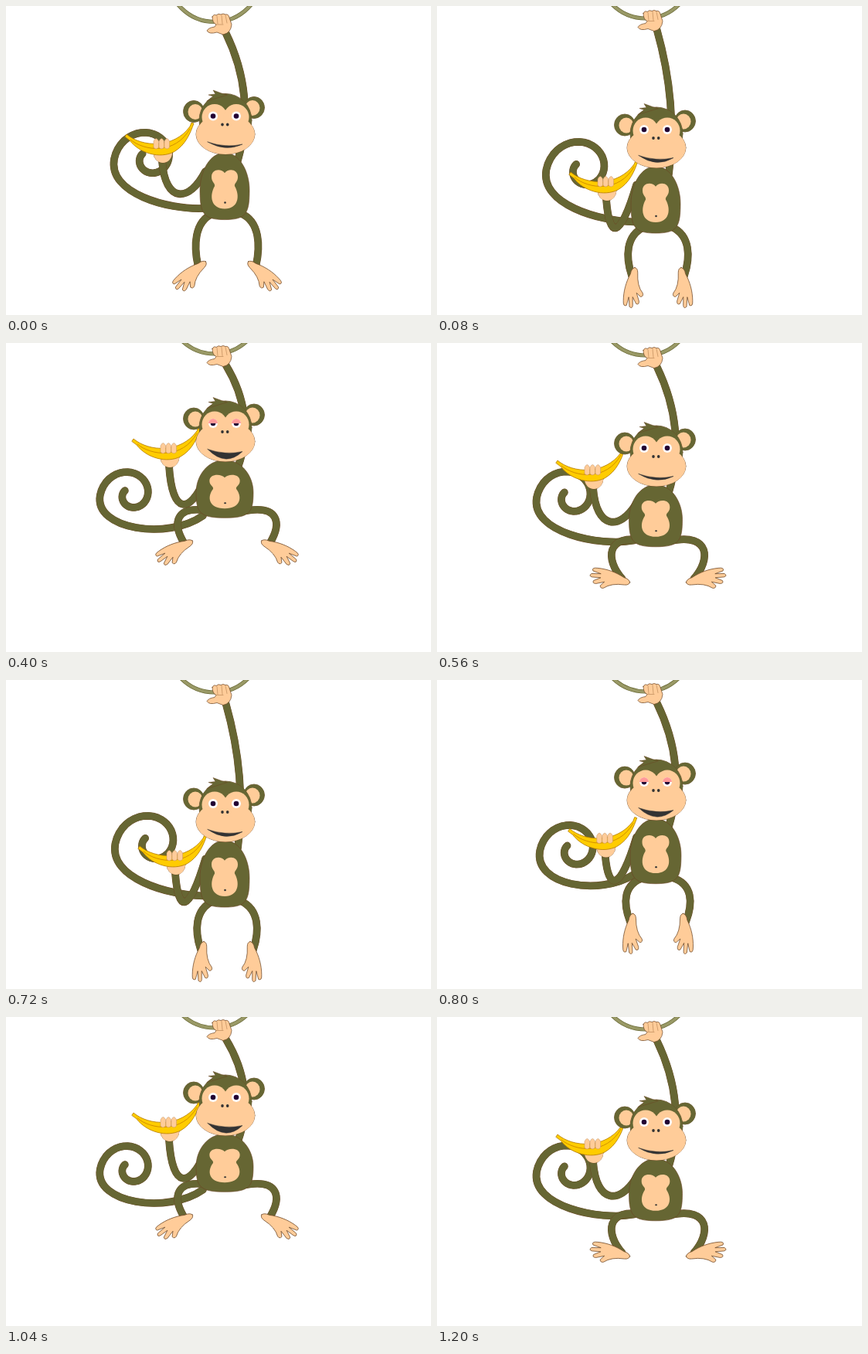
These frames come from a looping animation (550x400 px, 1.28 s). An HTML page with a canvas:

```html
<!DOCTYPE html>
<html>
<head>
<meta charset="utf-8">
<title>Swinging monkey</title>
<style>
html, body { margin: 0; width: 100%; height: 100%; overflow: hidden; background: #fff; }
canvas { display: block; }
</style>
</head>
<body>
<canvas id="stage" width="550" height="400"></canvas>
<script>
const ctx = document.getElementById('stage').getContext('2d');
const FUR = '#666633', SKIN = '#ffcc99', EDGE = '#6b4423', DARK = '#333333', LID = '#ff9999';

// Key values at steps 0, 1, 3, 5 and 7 of the eight-step bounce; the rest follows from them.
const keys = {
  lift: [[0], [17.5], [-41], [-38.5], [-6.5]],
  vine: [[0], [-4.5], [-6.5], [-6.5], [-4.5]],
  half: [[32], [32], [34.5], [37], [34.5]],                              // half width of the torso
  grip: [[201, 171], [218, 220], [213, 163], [210, 129], [201, 157]],    // fingertips on the banana
  curl: [[186, 198], [190, 212], [163, 225], [162, 197], [174, 200]],    // centre of the tail spiral
  ankle: [[37.5, 336], [34, 349], [41.5, 270], [55.5, 259], [46.5, 305]],
  knee: [[43, 38], [42, 80], [54, 68], [70, 26], [68, -15]]              // knee bow, foot angle
};

// Odd steps are posed; even ones lie on a cubic through their neighbours.
function poseAt(key, step) {
  if (step === 0) return key[0];
  const odd = i => key[1 + (i + 4) % 4];
  const i = (step - 1) >> 1;
  if (step % 2) return odd(i);
  return odd(i).map((v, j) => (9 * (v + odd(i + 1)[j]) - odd(i - 1)[j] - odd(i + 2)[j]) / 16);
}

function shape(d, fill, line, width = 0.7) {
  const path = new Path2D(d);
  if (fill) { ctx.fillStyle = fill; ctx.fill(path); }
  if (line) { ctx.strokeStyle = line; ctx.lineWidth = width; ctx.stroke(path); }
}

function oval(x, y, rx, ry, fill, line) {
  ctx.beginPath();
  ctx.ellipse(x, y, rx, ry, 0, 0, 7);
  if (line) { ctx.strokeStyle = line; ctx.lineWidth = 0.8; ctx.stroke(); }
  ctx.fillStyle = fill;
  ctx.fill();
}

function limb(d, width = 9) {
  shape(d, null, EDGE, width + 0.7);
  shape(d, null, FUR, width);
}

function placed(x, y, draw, sx = 1, sy = 1) {
  ctx.save();
  ctx.translate(x, y);
  ctx.scale(sx, sy);
  draw();
  ctx.restore();
}

// A sweep from the body into a shrinking spiral.
function drawTail([x, y], rootY, lift) {
  const radius = 46 + lift * 0.15;
  const sag = 53 - 0.8 * (rootY - y);
  const left = x - radius;
  let d = `M255,${rootY}C210,${rootY + sag} ${left - 8},${y + 45} ${left},${y}`;
  for (let q = 0.1; q < 4.5; q += 0.1) {
    const r = radius * 0.73 ** q, a = Math.PI * (1 + q / 2);
    d += `L${x + r * Math.cos(a)},${y + r * Math.sin(a)}`;
  }
  limb(d);
}

function drawVine(shift) {
  for (const [color, width] of [[FUR, 5.2], ['#999966', 3.8]]) {
    ctx.beginPath();
    ctx.arc(270, shift - 40.5, 61, 0, Math.PI);
    ctx.strokeStyle = color;
    ctx.lineWidth = width;
    ctx.stroke();
  }
}

function drawHangingHand() {
  shape('M-9,4Q-7,0 -4,2Q-1,-1 2,1Q5,-1 8,1Q12,0 13,5L16,14Q15,25 5,27L-3,24' +
    'Q-13,27 -16,22Q-14,18 -6,17L-4,14Q-9,12 -9,4Z', SKIN, EDGE);
  shape('M-3,3L-2,13M3,2L4,13M8,2L10,12M-4,14L5,14', null, '#b08050', 0.6);
}

// One right leg; the left is its mirror image.
function drawLeg(hipY, [x, y], [bow, angle]) {
  limb(`M18,${hipY}C${bow},${hipY + (56 - bow) * 0.8} ${bow},${y - 24} ${x},${y}`);
  ctx.translate(x, y);
  ctx.rotate(angle * Math.PI / 180);
  ctx.translate(-6, 4);
  shape('M-5,-2Q-3,-6 4,-6C16,-10 28,-11 40,-9Q48,-8 45,-4L34,-3L46,0Q49,4 44,4L33,2' +
    'L41,8Q42,12 37,11L27,6L31,12Q30,16 26,14Q18,5 1,3Q-5,2 -5,-2Z', SKIN, EDGE);
}

// The closer the hand is to the shoulder, the deeper the elbow hangs.
function drawBentArm([gx, gy], shoulderY) {
  const x = gx + 1, y = gy + 30;
  const elbow = (shoulderY + y) / 2 + 105 - Math.hypot(258 - x, shoulderY - y);
  limb(`M258,${shoulderY}C237,${elbow} ${x + 4},${elbow} ${x},${y}`);
}

function drawBanana() {
  oval(2, 19, 12, 13, SKIN, EDGE);
  shape('M-47,-2L-45,-5C-25,12 16,14 37,-15L39,-20L42,-19C38,-8 32,9 16,18C-2,27 -28,20 -41,3Z',
    '#ffcc00', '#b37a00', 0.8);
  shape('M-40,2C-22,17 18,22 37,-12', null, '#cc8800', 0.9);
  for (let x = -10; x < 10; x += 7) {
    shape(`M${x},12V4Q${x + 3.3},-3 ${x + 6.6},4V12Q${x + 3},16 ${x},12Z`, SKIN, '#c09060', 0.5);
  }
}

function drawTorso() {
  shape('M0,0C-20,0 -32,25 -32,48C-32,78 -28,86 0,86C28,86 32,78 32,48C32,25 20,0 0,0Z', FUR, EDGE, 0.6);
  shape('M0,26C-4,20 -17,20 -17,31C-17,38 -12,39 -13,43C-20,55 -18,72 0,72' +
    'C18,72 20,55 13,43C12,39 17,38 17,31C17,20 4,20 0,26Z', SKIN);
  oval(0.5, 64, 1.3, 1.2, DARK);
}

function drawEye(x, lid) {
  const y = 142.5;
  oval(x, y, 6, 6, '#fff');
  oval(x, y, 3.3, 3.3, '#220033');
  if (lid === 2) oval(x, y, 6, 6, LID);
  if (lid === 1) shape(`M${x - 6},${y}A6,6 0 0 1 ${x + 6},${y}Z`, LID);
}

function drawHead(lid, open) {
  oval(243, 136.5, 13.5, 14, FUR, EDGE);
  oval(245, 137, 9.5, 10, SKIN);
  oval(321, 131.5, 13.5, 14, FUR, EDGE);
  oval(319, 132, 9.5, 10, SKIN);
  oval(284, 148, 34, 34.5, FUR, EDGE);
  shape('M260,123L268,117L262,115L271,114L268,109L279,113L286,115Z', FUR, EDGE, 0.5);
  oval(284, 166, 38, 26, SKIN, EDGE);
  for (const x of [270, 298]) oval(x, 144, 16.5, 17, SKIN);
  for (const x of [268, 298]) drawEye(x, lid);
  for (const x of [280, 286.7]) oval(x, 153.5, 1.8, 2, DARK);
  shape(`M261,176Q284,184 306,179Q284,${184 + 2 * open} 261,176Z`, DARK, DARK, 0.5);
}

function draw(now) {
  const tick = Math.floor(now % 1280 / 80), step = tick % 8;
  const pose = {};
  for (const part in keys) pose[part] = poseAt(keys[part], step);
  const { grip, curl, ankle, knee, lift: [lift], vine: [vine], half: [half] } = pose;
  const top = 190 + lift, height = 2770 / half;
  const open = 6 + 3.5 * Math.cos((step - 3.7) * Math.PI / 4);
  const lid = Math.max(0, 2 - Math.min(Math.abs(tick - 4), Math.abs(tick - 11)));

  ctx.fillStyle = '#fff';
  ctx.fillRect(0, 0, 550, 400);
  ctx.lineCap = ctx.lineJoin = 'round';
  drawTail(curl, top + 72, lift);
  drawVine(vine);
  limb(`M284.5,${35 + vine}Q${324 - Math.max(0, lift) * 0.7},${(top + 10) * 0.58} 300,${top + 10}`);
  placed(276, 10 + vine, drawHangingHand);
  for (const side of [-1, 1]) placed(286, 0, () => drawLeg(top + height - 8, ankle, knee), side);
  drawBentArm(grip, top + 24);
  placed(283, top, drawTorso, half / 32, height / 86);
  placed(...grip, drawBanana);
  placed(0, lift, () => drawHead(lid, open));
}

const start = performance.now();
function loop() {
  draw(performance.now() - start);
  requestAnimationFrame(loop);
}
loop();
</script>
</body>
</html>
```
